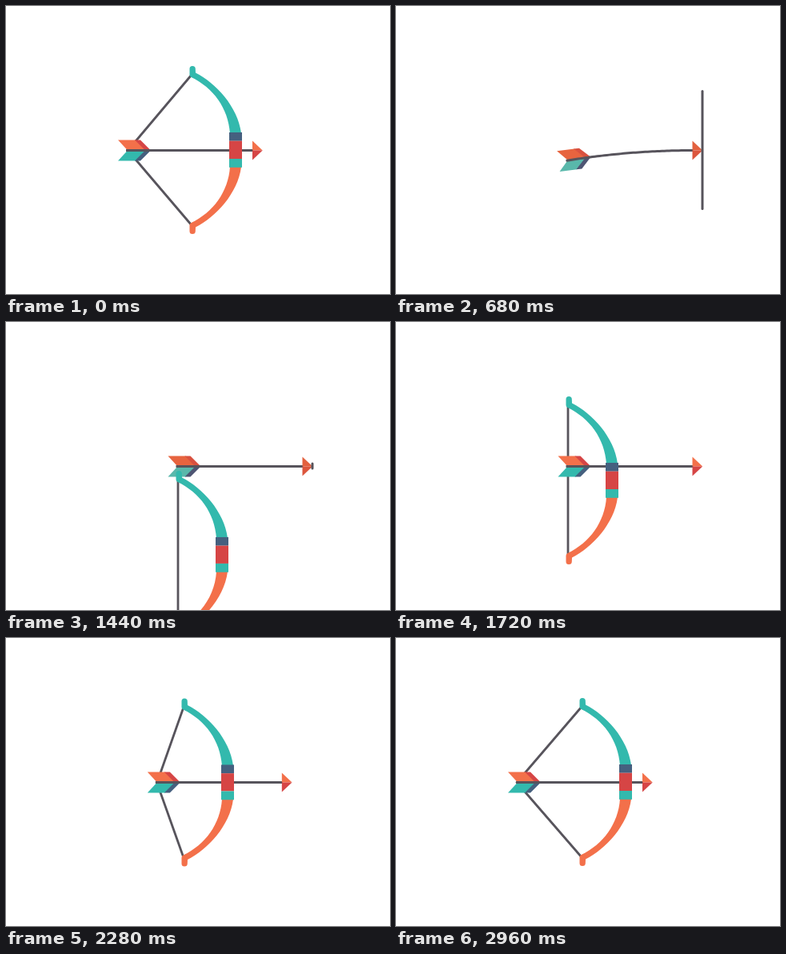
Animation of 480x360 px, one loop 3 s. Source, as an HTML page with a canvas:

```html
<!DOCTYPE html>
<html lang="en">
<head>
<meta charset="utf-8">
<title>Bow and arrow loop</title>
<style>
  html, body { margin: 0; width: 100%; height: 100%; overflow: hidden; background: #fff; }
  canvas { display: block; }
</style>
</head>
<body>
<canvas id="stage" width="480" height="360"></canvas>
<script>
const ctx = document.getElementById('stage').getContext('2d');

const LOOP = 3000;
const HIT = 480;          // arrow reaches the wall
const AXIS = 180.5;       // height of the arrow
const TRAVEL = 62.5;      // arrow path between drawn and stuck
const BOW_TRAVEL = 17;

const TEAL = '#33b9ad', ORANGE = '#f3704a', RED = '#d64545', NAVY = '#45607f';
const LINE = '#57545c';

// Arrow colours: upper vane, its edge, lower vane, its edge, head top, head bottom
const RESTING = [ORANGE, RED, TEAL, NAVY, ORANGE, RED];
const FLYING = ['#e7643f', '#d9513f', '#59b8ab', '#4e5573', '#e3613f', '#dc563d'];

const clamp = v => Math.max(0, Math.min(1, v));
const span = (t, from, to) => clamp((t - from) / (to - from));
const easeOut = p => 1 - (1 - p) ** 3;
const easeInOut = p => (1 - Math.cos(Math.PI * p)) / 2;

function poly(color, ...pts) {
  ctx.fillStyle = color;
  ctx.beginPath();
  for (let i = 0; i < pts.length; i += 2) ctx.lineTo(pts[i], pts[i + 1]);
  ctx.closePath();
  ctx.fill();
}

function stroke(width, cap, trace) {
  ctx.strokeStyle = LINE;
  ctx.lineWidth = width;
  ctx.lineCap = cap;
  ctx.lineJoin = 'round';
  ctx.beginPath();
  trace();
  ctx.stroke();
}

function limb(color, flip) {
  ctx.save();
  ctx.translate(0, 180);
  ctx.scale(1, flip);
  ctx.fillStyle = color;
  ctx.fill(new Path2D('M229.5-101.5Q229.5-105 233-105Q236.8-105 236.8-101.5L237-96.5' +
    'C262-84 290-54 294-21L280-21C278-52 259-78 231.5-91Q229.5-92 229.5-94Z'));
  ctx.restore();
}

function drawString(x, y, pull) {
  stroke(2.8, 'butt', () => {
    ctx.moveTo(x + 232, y + 86);
    ctx.lineTo(x + 232 - 81 * pull, y + AXIS);
    ctx.lineTo(x + 232, y + 274);
  });
}

function drawBow(x, y) {
  ctx.save();
  ctx.translate(x, y);
  limb(TEAL, 1);
  limb(ORANGE, -1);
  ctx.fillStyle = NAVY;
  ctx.fillRect(279, 158, 16, 10.7);
  ctx.fillStyle = RED;
  ctx.fillRect(279, 168.7, 16, 22.3);
  ctx.fillStyle = TEAL;
  ctx.fillRect(279, 191, 16, 10.8);
  ctx.restore();
}

// sag: how far the shaft is bent down at the vanes
function drawArrow(dx, sag, look) {
  const [up, upEdge, low, lowEdge, headUp, headLow] = look;
  const reach = 129;
  ctx.save();
  ctx.translate(dx, AXIS);

  ctx.save();
  ctx.translate(180, sag);
  ctx.rotate(-Math.atan(2 * sag / reach));
  poly(up, -40, -13, -18, -13, -5, 0, -28, 0);
  poly(upEdge, -19, -13, -12, -13, 1, 0, -6, 0);
  poly(low, -40, 13, -18, 13, -5, 0, -28, 0);
  poly(lowEdge, -19, 13, -12, 13, 1, 0, -6, 0);
  ctx.restore();

  stroke(3, 'butt', () => {
    for (let x = 150; x <= 309; x += 3) {
      ctx.lineTo(x, sag * ((309 - x) / reach) ** 2);
    }
  });
  poly(headUp, 308, -12, 320.7, 0, 308, 0);
  poly(headLow, 308, 12, 320.7, 0, 308, 0);
  ctx.restore();
}

function drawWall(x, size) {
  if (size <= 0) return;
  const half = 73.5 * size;
  stroke(3, 'round', () => {
    ctx.moveTo(x, 180 - half);
    ctx.lineTo(x, 180 + half);
  });
}

function draw(t) {
  ctx.fillStyle = '#fff';
  ctx.fillRect(0, 0, 480, 360);

  const released = t < 1000;
  const pull = easeOut(span(t, 2150, 2960));
  const arrowX = released ? TRAVEL * span(t, 0, HIT) ** 1.25 : TRAVEL * (1 - pull);

  let bowX, bowY, stringPull;
  if (released) {
    bowX = -330 * (t / 170) ** 2;
    bowY = 0;
    stringPull = 1 - span(t, 0, 60);
  } else {
    bowX = BOW_TRAVEL * (pull - 1);
    bowY = 23.5 * Math.exp((1680 - t) / 154);
    stringPull = pull;
  }

  const since = t - HIT;
  const sag = since > 0 && t < 1700
    ? 17.5 * Math.exp(-0.0036 * since) * Math.sin(2 * Math.PI * since / 160)
    : 0;

  const bowSeen = released ? bowX > -300 : bowY < 290;
  if (bowSeen) drawString(bowX, bowY, stringPull);
  drawArrow(arrowX, sag, t >= 40 && t < 1700 ? FLYING : RESTING);
  if (bowSeen) drawBow(bowX, bowY);

  const wallX = 383 + 0.9 * Math.max(0, HIT - t);
  drawWall(wallX, 1 - easeInOut(span(t, 1180, 1480)));
}

const start = performance.now();
function tick() {
  draw((performance.now() - start) % LOOP);
  requestAnimationFrame(tick);
}
tick();
</script>
</body>
</html>
```
